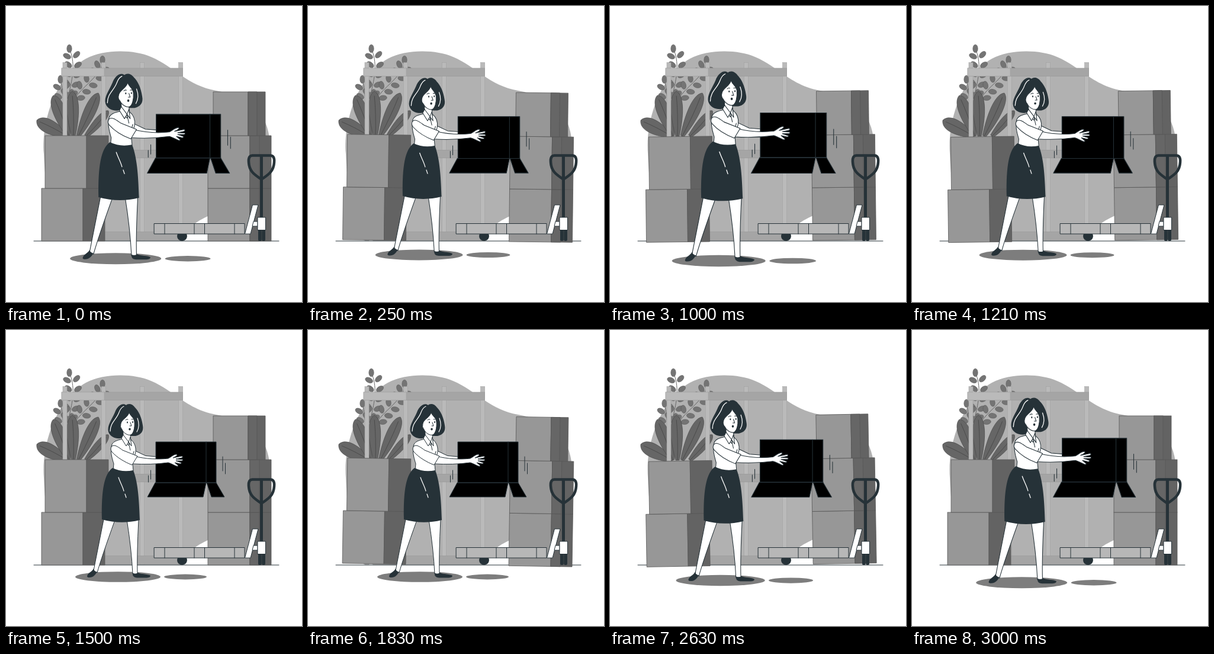
Recreate the animation shown at these times as an HTML page. Size 500 by 500 pixels, loop 3040 ms.

```html
<!DOCTYPE html>
<html lang="en">
<head>
<meta charset="utf-8">
<title>Packing boxes</title>
<style>
  html, body { margin: 0; width: 100%; height: 100%; overflow: hidden; background: #fff; }
  svg { display: block; width: 100vw; height: 100vh; }
  .ink { fill: #263238; }
  .line { fill: none; stroke: #263238; stroke-width: 1; stroke-linecap: round; stroke-linejoin: round; }
  .paper { fill: #fff; stroke: #263238; stroke-width: 1; stroke-linejoin: round; }
  .shine { fill: none; stroke: #fff; stroke-width: 1.2; stroke-linecap: round; }
  .carton { fill: #000; stroke: #263238; stroke-width: 1; stroke-linejoin: round; }
  .post { fill: #bababa; stroke: #a2a2a2; stroke-width: .6; }
  .bar { fill: #a5a5a5; stroke: #979797; stroke-width: .6; }
  .leaf { fill: #666; stroke: #4a4a4a; stroke-width: .7; }
  .bud { fill: #747474; stroke: #5d5d5d; stroke-width: .6; }
  .stem { fill: none; stroke: #666; stroke-width: 1; }
  .vein { fill: none; stroke: #444; stroke-width: .8; }
  #boxes { stroke: #575757; stroke-width: .8; transform-origin: 254px 271px; }
  #woman { transform-origin: 244px 277px; }
</style>
</head>
<body>
<svg viewBox="0 0 500 500">
  <path fill="#b1b1b1" d="M64 250C59 190 88 115 135 89C165 73 215 73 245 86C285 103 305 134 355 143C402 151 438 172 445 222C449 280 400 325 341 355C312 368 305 381 298 397H110C72 360 66 300 64 250Z"/>

  <g id="plant">
    <path class="stem" d="M107 72C117 95 113 118 108 140S101 195 102 219"/>
    <path class="stem" d="M163 91C164 112 140 128 124 146S104 190 104 219"/>
    <path class="stem" d="M92 124C96 140 98 170 101 219"/>
  </g>
  <g id="shelf"></g>
  <path class="line" d="M47 397H461"/>
  <g id="boxes"></g>

  <g id="jack">
    <circle class="ink" cx="297.500" cy="388.500" r="8.500"/>
    <rect x="250.500" y="367.500" width="152.500" height="17.500" fill="#b7b7b7"/>
    <path class="line" d="M250.500 367.500H403V385H250.500ZM268 367.500V385M318 367.500V385M335.500 367.500V385M386 367.500V385"/>
    <path class="paper" d="M403.500 385L416.500 336H426L413 385Z"/>
    <path class="paper" d="M418 364H425V372H416Z"/>
    <rect class="ink" x="426" y="377" width="5.800" height="20" rx="2.500"/>
    <rect class="ink" x="432.200" y="377" width="5.800" height="20" rx="2.500"/>
    <path fill="none" stroke="#263238" stroke-width="5" d="M431.500 252V358"/>
    <path fill="none" stroke="#263238" stroke-width="4.500" stroke-linejoin="round" d="M416 252.500H447Q454 253 453 264C452 281 441 286 431.500 293C422 286 411 281 410 264Q409 253 416 252.500Z"/>
    <rect class="paper" x="425" y="357" width="13.500" height="21.500"/>
  </g>

  <g id="woman">
    <ellipse cx="189" cy="417" rx="72" ry="8.800" fill="#7d7d7d"/>
    <ellipse cx="303" cy="417" rx="36" ry="4.400" fill="#7d7d7d"/>

    <path class="paper" d="M165 320L148 406L154 410Q161 385 184 321Z"/>
    <path class="paper" d="M204 320Q212 370 214 412H222Q221 380 224 320Z"/>
    <path class="ink" d="M137 416C138 410 145 409 148 403C149 407 151 410 154 408C151 414 147 418 141 418Q137 418 137 416Z"/>
    <path class="ink" d="M214 410C217 413 220 412 223 410C229 413 240 412 244 415Q244 418 238 418.500H221Q213 418 214 410Z"/>

    <path class="paper" d="M216 203L236 212.500L256 214V222H214Z"/>
    <path class="paper" d="M198 184C188 186 179 188 178 197C176 208 180 219 182 226L181 237Q197 242 215 238L214 226L219 206C220 198 217 190 211 185Z"/>
    <path class="ink" d="M180 233C166 243 161 270 162 320Q194 329 226 321C225 295 224 260 215 237Q196 241 180 233Z"/>
    <path class="shine" d="M190 249C193 258 197 264 199 272M201 277L203 283"/>

    <path class="ink" d="M203 127C197 122 188 128 184 139C179 151 170 162 173 172C176 181 186 184 193 183C199 182 203 181 206 179L219 179C228 177 233 171 231 161C229 147 224 137 218 131C213 124 206 124 203 127Z"/>
    <path class="paper" d="M198 166V185L207 195L211 188L210 177Z"/>
    <path class="paper" d="M194 158C196 150 206 148 208 139C210 146 216 147 217 155C218 166 215 175 211 177C205 179 198 173 196 168Q192 164 194 158Z"/>
    <path class="shine" d="M176 171C176 156 187 151 191 139Q194 131 199 129M222 149Q227 162 221 172"/>
    <ellipse class="ink" cx="205" cy="156" rx="1" ry="1.500"/>
    <ellipse class="ink" cx="214" cy="155.500" rx="1" ry="1.500"/>
    <ellipse class="ink" cx="209" cy="167.500" rx="1.700" ry="1.900"/>
    <path class="line" d="M202 152Q204 150 206 151M212 151Q214 150 215 151M210 156L212 162H209"/>
    <path class="paper" d="M198 177L207 189L203 196L195 183ZM210 181L212 196L207 189Z"/>
    <path class="line" d="M207 190L210 203M216 205L214 213"/>

    <path class="carton" d="M253 189H355V258H253Z"/>
    <path class="carton" d="M252 258H338L333 282H239Z"/>
    <path class="carton" d="M339 258H355L369 282H347Z"/>
    <path class="line" d="M338 189V258M253 258H355"/>
    <path class="line" d="M366 214V238M370.500 225V243M240.500 246V257M244.500 237V252"/>

    <path class="paper" d="M216 213C236 218 257 219 274 217C280 214 283 210 288 210Q291 211 286 214L282 216L297 213Q300 214 297 216L287 218L298 218.500Q300 220 297 221L287 221L296 224Q297 226 294 226L285 224L291 229Q291 231 288 230C281 227 278 225 274 224Q245 228 213 226Z"/>
    <path class="paper" d="M179 196C184 193 190 198 197 203L222 213L213 228C200 223 187 215 179 206Q175 201 179 196Z"/>
  </g>
</svg>
<script>
  const NS = "http://www.w3.org/2000/svg";
  const $ = id => document.getElementById(id);
  const add = (parent, tag, attrs) => {
    const el = document.createElementNS(NS, tag);
    for (const key in attrs) el.setAttribute(key, attrs[key]);
    parent.append(el);
  };
  const rect = (parent, x, y, width, height, attrs) =>
    add(parent, "rect", { x, y, width, height, ...attrs });

  // A bud at the tip of each stem, then pairs further down
  const bud = (x, y, tilt) => add($("plant"), "ellipse", {
    rx: 4.2, ry: 6.8, class: "bud", transform: `translate(${x} ${y}) rotate(${tilt})`
  });
  for (const stem of document.querySelectorAll(".stem")) {
    const end = stem.getTotalLength() * .6;
    const tip = stem.getPointAtLength(0);
    bud(tip.x, tip.y, 0);
    for (let d = 18; d < end; d += 16) {
      const p = stem.getPointAtLength(d), q = stem.getPointAtLength(d + 1);
      const angle = Math.atan2(q.y - p.y, q.x - p.x);
      for (const side of [-1, 1]) {
        const out = angle + Math.PI + side * .95;
        bud(p.x + 10 * Math.cos(out), p.y + 10 * Math.sin(out), out * 180 / Math.PI + 90);
      }
    }
  }

  // A broad leaf from its root to its tip
  const leaf = (rootX, tipX, tipY, width) => {
    const rootY = 220, dx = tipX - rootX, dy = tipY - rootY, len = Math.hypot(dx, dy);
    const at = (along, off) =>
      `${rootX + dx * along - dy / len * off} ${rootY + dy * along + dx / len * off}`;
    add($("plant"), "path", {
      class: "leaf",
      d: `M${at(0, 3)}C${at(.4, width)} ${at(.9, width * 1.3)} ${at(1, 0)}` +
         `C${at(.9, -width * 1.3)} ${at(.4, -width)} ${at(0, -3)}Z`
    });
    add($("plant"), "path", { class: "vein", d: `M${at(0, 0)}Q${at(.5, 2)} ${at(.9, 0)}` });
  };
  leaf(104, 52, 193, 13);
  leaf(106, 80, 151, 12);
  leaf(114, 112, 144, 11);
  leaf(122, 156, 147, 11);
  leaf(135, 173, 177, 8);

  const shelf = $("shelf");
  for (let i = 0; i < 4; i++) rect(shelf, 96 + 65.2 * i, 95.5, 7, 301, { class: "post" });
  for (let i = 0; i < 3; i++) rect(shelf, 94, 105 + 138.3 * i, 204.5, 13.5, { class: "bar" });
  rect(shelf, 94, 105, 72, 13.5, { class: "post" });

  const carton = (x, y, height, front, side, tape = 0) => {
    rect($("boxes"), x, y, front, height, { fill: "#979797" });
    rect($("boxes"), x + front, y, side, height, { fill: "#636363" });
    if (tape) rect($("boxes"), x + front, y, tape, height, { fill: "#666" });
  };
  for (const row of [0, 1]) {
    carton(60 + 6 * row, 308 - 89 * row, 89, 70, 37);
    carton(341, 308 - 89 * row, 89, 71, 36, 16);
  }
  carton(350, 145, 74, 59, 29, 15);

  const LOOP = 3040, CYCLE = 3000;
  const sway = t => 2 / Math.PI * Math.asin(Math.sin(2 * Math.PI * t / 1500));
  const beat = (t, peak, rise, fall) => {
    const d = t - peak;
    return Math.max(0, 1 - (d < 0 ? -d / rise : d / fall));
  };

  function draw(now) {
    const t = Math.min(now % LOOP, CYCLE);
    const swell = beat(t, 990, 300, 300) +
      beat(t, 2830, 350, 560) + beat(t + CYCLE, 2830, 350, 560);
    $("boxes").style.transform = `rotate(${sway(t)}deg)`;
    $("woman").style.transform = `scale(${1 + .1 * swell})`;
    requestAnimationFrame(draw);
  }
  const start = performance.now();
  requestAnimationFrame(() => draw(performance.now() - start));
</script>
</body>
</html>
```
